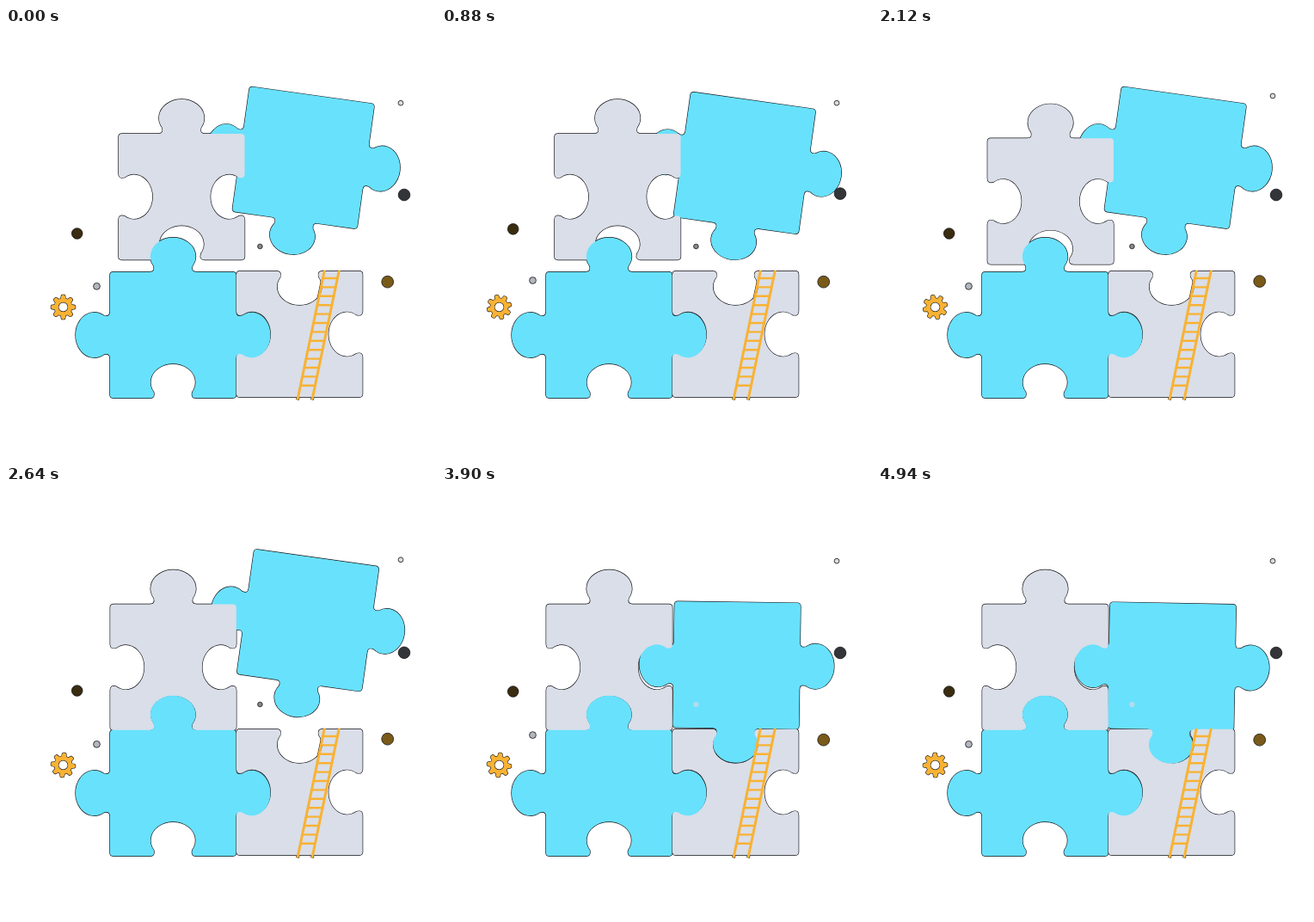
Animation of 500 by 500 pixels, one loop 4980 ms. Source, as an HTML page with a canvas:

```html
<!DOCTYPE html>
<html>
<head>
<meta charset="utf-8">
<style>
html, body { margin: 0; width: 100%; height: 100%; overflow: hidden; background: #fff; }
canvas { display: block; }
</style>
</head>
<body>
<canvas id="stage" width="500" height="500"></canvas>
<script>
const ctx = document.getElementById('stage').getContext('2d');
const LOOP = 4980, HALF = 73.3, TAB = 7, NECK = 22.5;
const BLUE = '#68e1fd', GREY = '#d9dee8', GOLD = '#f9b233', EDGE = '#141418';

// Smooth 0 to 1 step
function ease(t, start, length) {
  const p = Math.min(1, Math.max(0, (t - start) / length));
  return p * p * (3 - 2 * p);
}

// One swing out and back, 0 to 1 to 0
function bob(t, start, length) {
  const p = (t - start) / length;
  return p > 0 && p < 1 ? Math.sin(Math.PI * p) ** 2 : 0;
}

// Sides run top, right, bottom, left: 1 is a tab, -1 a notch, 0 is flat
function piece(x, y, angle, sides) {
  let d = `M${4 - HALF} ${-HALF}`;
  sides.forEach((side, i) => {
    const c = Math.round(Math.cos(i * Math.PI / 2));
    const s = Math.round(Math.sin(i * Math.PI / 2));
    const at = (u, v) => `${u * c + (HALF + v) * s} ${u * s - (HALF + v) * c} `;
    if (side) {
      d += `L${at(-27, 0)}Q${at(-20.5, 0)}${at(-NECK, TAB * side)}` +
        `A26.3 21.7 ${i * 90} 1 ${side > 0 ? 1 : 0} ${at(NECK, TAB * side)}` +
        `Q${at(20.5, 0)}${at(27, 0)}`;
    }
    d += `L${at(HALF - 4, 0)}Q${at(HALF, 0)}${at(HALF, -4)}`;
  });
  const path = new Path2D();
  path.addPath(new Path2D(d + 'Z'), new DOMMatrix().translate(x, y).rotate(angle));
  return path;
}

function gear(x, y, turn) {
  const path = new Path2D();
  for (let a = 0; a < 2 * Math.PI; a += Math.PI / 80) {
    const r = 12.2 + 2 * Math.tanh(2.5 * Math.cos(8 * a));
    path.lineTo(x + r * Math.sin(a + turn), y - r * Math.cos(a + turn));
  }
  path.closePath();
  path.moveTo(x + 5.7, y);
  path.arc(x, y, 5.7, 0, 7);
  return path;
}

function stroke(path, color, width) {
  ctx.strokeStyle = color;
  ctx.lineWidth = width;
  ctx.stroke(path);
}

function fill(path, color) {
  ctx.fillStyle = color;
  ctx.fill(path, 'evenodd');
}

function dot(x, y, r, color, line = EDGE) {
  const path = new Path2D();
  path.arc(x, y, r, 0, 7);
  fill(path, color);
  stroke(path, line, .8);
}

const rails = new Path2D('M370.3 282L339 432.3M387.3 282L356 432.3');
const rungs = new Path2D();
for (let y = 291; y < 425; y += 10.4) {
  const x = 370.3 - (y - 282) * .208;
  rungs.moveTo(x, y);
  rungs.lineTo(x + 17, y);
}

function draw(t) {
  ctx.clearRect(0, 0, 500, 500);

  const hover = 6.2 * (bob(t, 0, 1800) + bob(t, 2120, 840));
  const slide = ease(t, 1800, 780);
  const drop = ease(t, 2980, 840);
  const settle = ease(t, 3820, 1120);
  const x = 345.7 + hover - 3 * ease(t, 2960, 250) - settle;
  const y = 150.8 + hover + 57.6 * drop + 1.3 * settle;
  const tilt = 8 - 7.2 * drop + .3 * settle;

  const pieces = [
    [piece(x, y, tilt, [0, 1, 1, 1]), BLUE],
    [piece(204.2 - 9.7 * slide, 196.2 + 14.5 * slide, 0, [1, -1, -1, -1]), GREY],
    [piece(341.3, 356, 0, [-1, -1, 0, -1]), GREY],
    [piece(194.2, 357, 0, [1, 1, -1, 1]), BLUE]
  ];

  // Edges sit under every fill, so they show only against the background
  pieces.forEach(([path]) => stroke(path, EDGE, 1.3));
  stroke(rails, EDGE, 3.8);
  pieces.forEach(([path, color]) => fill(path, color));
  stroke(rails, GOLD, 3);
  stroke(rungs, GOLD, 2.4);

  const cog = gear(66.5, 324.5, t / LOOP * Math.PI);
  stroke(cog, EDGE, 1.2);
  fill(cog, GOLD);

  dot(82.7, 239 - 11 * (bob(t, 0, 1160) + bob(t, 2520, 1280)), 6.3, '#3a2c10');
  dot(105.5, 300.3 - 7.3 * bob(t, 0, 2120) - 10.7 * bob(t, 3160, 1480), 3.9, '#b2b6bd');
  dot(463, 194 - 1.5 * bob(t, 0, 2120) - bob(t, 2420, 1480), 6.8, '#343539');
  dot(443.7, 295.2 - bob(t, 1400, 2480), 6.9, '#7a5a18');
  dot(459, 87.2 - 8.2 * bob(t, 1400, 1440), 2.9, '#dcdcde');

  // The last dot turns pale once the falling piece lies behind it
  const behind = y + HALF > 255;
  dot(295.4, 254, 2.8, behind ? '#b4dcea' : '#8a8a8c', behind ? '#b4dcea' : EDGE);
}

const start = performance.now();
function tick() {
  draw((performance.now() - start) % LOOP);
  requestAnimationFrame(tick);
}
tick();
</script>
</body>
</html>
```
